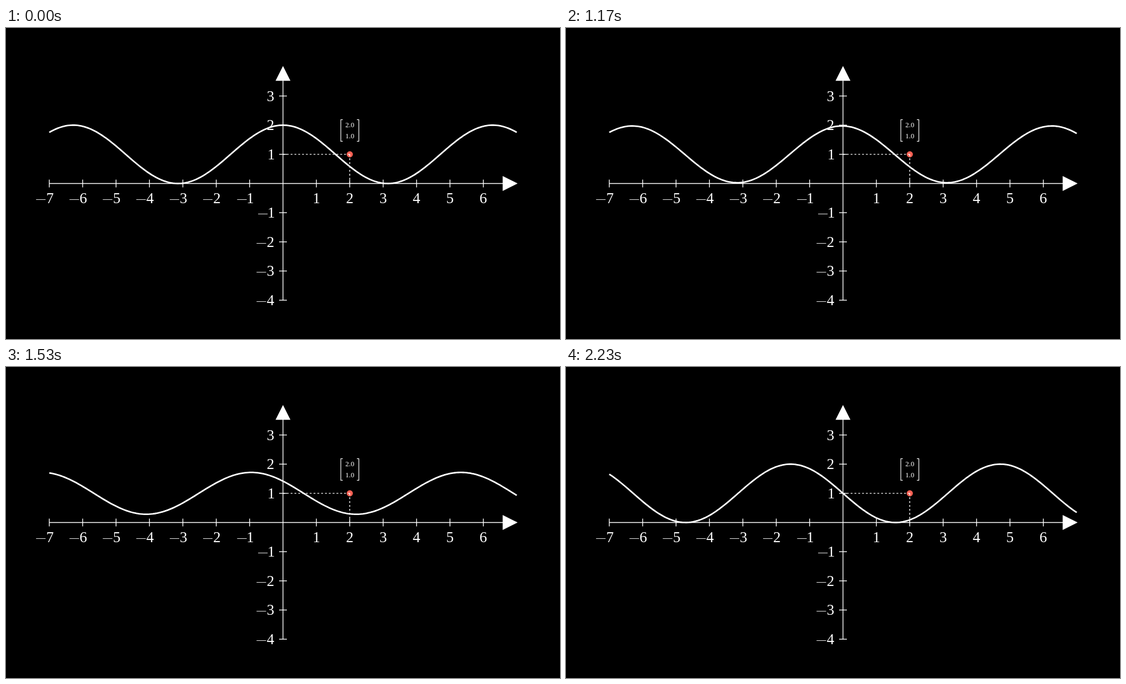
Recreate the animation shown at these times as an HTML page. Size 998x561 px, loop 4.01 s.

```html
<!DOCTYPE html>
<html lang="en">
<head>
<meta charset="utf-8">
<title>Cosine to sine</title>
<style>
  html, body { margin: 0; width: 100%; height: 100%; overflow: hidden; background: #000; }
  svg { display: block; width: 998px; height: 561px; }
  text { fill: #fff; font-family: "Liberation Serif", "Times New Roman", serif; text-anchor: middle; }
  .digit { font-size: 27px; }
  .minus { font-size: 16.5px; text-anchor: start; stroke: #fff; stroke-width: .3; }
  .entry { font-size: 13px; }
  .line { fill: none; stroke: #fff; stroke-width: 1.4; }
</style>
</head>
<body>
<svg id="stage" viewBox="0 0 998 561">
  <g id="axes"></g>
  <path id="curve" fill="none" stroke="#fff" stroke-width="2.8" stroke-linejoin="round"/>
  <g id="point"></g>
</svg>
<script>
const NS = 'http://www.w3.org/2000/svg';
const UNIT = 70.17;
const UX = UNIT * 12 / 14, UY = UNIT * 6 / 8;
const px = x => 499 + x * UX;
const py = y => 280.5 - y * UY;
const axes = document.getElementById('axes');
const point = document.getElementById('point');
const curve = document.getElementById('curve');

function add(parent, tag, attrs, text) {
  const el = document.createElementNS(NS, tag);
  for (const key in attrs) el.setAttribute(key, attrs[key]);
  if (text) el.textContent = text;
  parent.appendChild(el);
  return el;
}

const line = (parent, d, extra) => add(parent, 'path', { class: 'line', d, ...extra });

const digitWidth = n => Math.abs(n) === 1 ? 9.1 : 11.8;

function label(n, x, baseline, minusX) {
  const t = add(axes, 'text', {});
  if (n < 0) add(t, 'tspan', { class: 'minus', x: minusX, y: baseline - 3.2 }, '\u2014');
  add(t, 'tspan', { class: 'digit', x, y: baseline }, String(Math.abs(n)));
}

function buildAxes() {
  line(axes, `M${px(-7)} 280.5H896M499 ${py(-4)}V94`);
  line(axes, 'M499 70L511.3 94.6H486.7Z', { style: 'fill:#fff' });
  line(axes, 'M920 280.5L895.4 268.2V292.8Z', { style: 'fill:#fff' });

  for (let n = -7; n < 7; n++) {
    if (!n) continue;
    const x = px(n);
    line(axes, `M${x} 273.5v14`);
    label(n, n < 0 ? x + 1.2 : x, 316, x - 17.5 - digitWidth(n) / 2);
  }
  for (let n = -4; n < 4; n++) {
    if (!n) continue;
    const y = py(n), w = digitWidth(n);
    line(axes, `M492 ${y}h14`);
    label(n, 482.4 - w / 2, y + 9, 482.4 - w - 18.8);
  }
}

// Evenly dashed line that starts and ends with a full dash.
function dashed(d, length) {
  const count = Math.ceil(length / (UNIT * 0.1));
  const dash = length / 2 / count, gap = length / 2 / (count - 1);
  line(point, d, { 'stroke-dasharray': `${dash} ${gap}` });
}

function buildPoint() {
  const x = px(2), y = py(1);
  add(point, 'circle', { cx: x, cy: y, r: 5.6, fill: '#fc6255' });
  dashed(`M499 ${y}H${x}`, 2 * UX);
  dashed(`M${x} 280.5V${y}`, UY);
  line(point, 'M606.6 165.4H603.2V204.4H606.6M632.2 165.4H635.6V204.4H632.2',
    { style: 'stroke-width:1.2' });
  add(point, 'text', { class: 'entry', x, y: 179 }, '2.0');
  add(point, 'text', { class: 'entry', x, y: 199 }, '1.0');
}

const LOOP = 4010, START = 1000, FPS = 30;
const sigmoid = v => 1 / (1 + Math.exp(-v));

function smooth(t) {
  const edge = sigmoid(-5);
  return (sigmoid(10 * (t - 0.5)) - edge) / (1 - 2 * edge);
}

function drawCurve(mix) {
  let d = '';
  for (let i = 0; i <= 280; i++) {
    const x = -7 + i / 20;
    const y = 1 + (1 - mix) * Math.cos(x) - mix * Math.sin(x);
    d += (i ? 'L' : 'M') + px(x).toFixed(2) + ' ' + py(y).toFixed(2);
  }
  curve.setAttribute('d', d);
}

let shown = -1;
function render(ms) {
  const step = Math.floor((ms % LOOP - START + 3.4) * FPS / 1000);
  const tick = Math.min(FPS, Math.max(0, step));
  if (tick !== shown) {
    shown = tick;
    drawCurve(smooth(tick / FPS));
  }
}

buildAxes();
buildPoint();
render(0);
const began = performance.now();
function loop() {
  render(performance.now() - began);
  requestAnimationFrame(loop);
}
requestAnimationFrame(loop);
</script>
</body>
</html>
```
